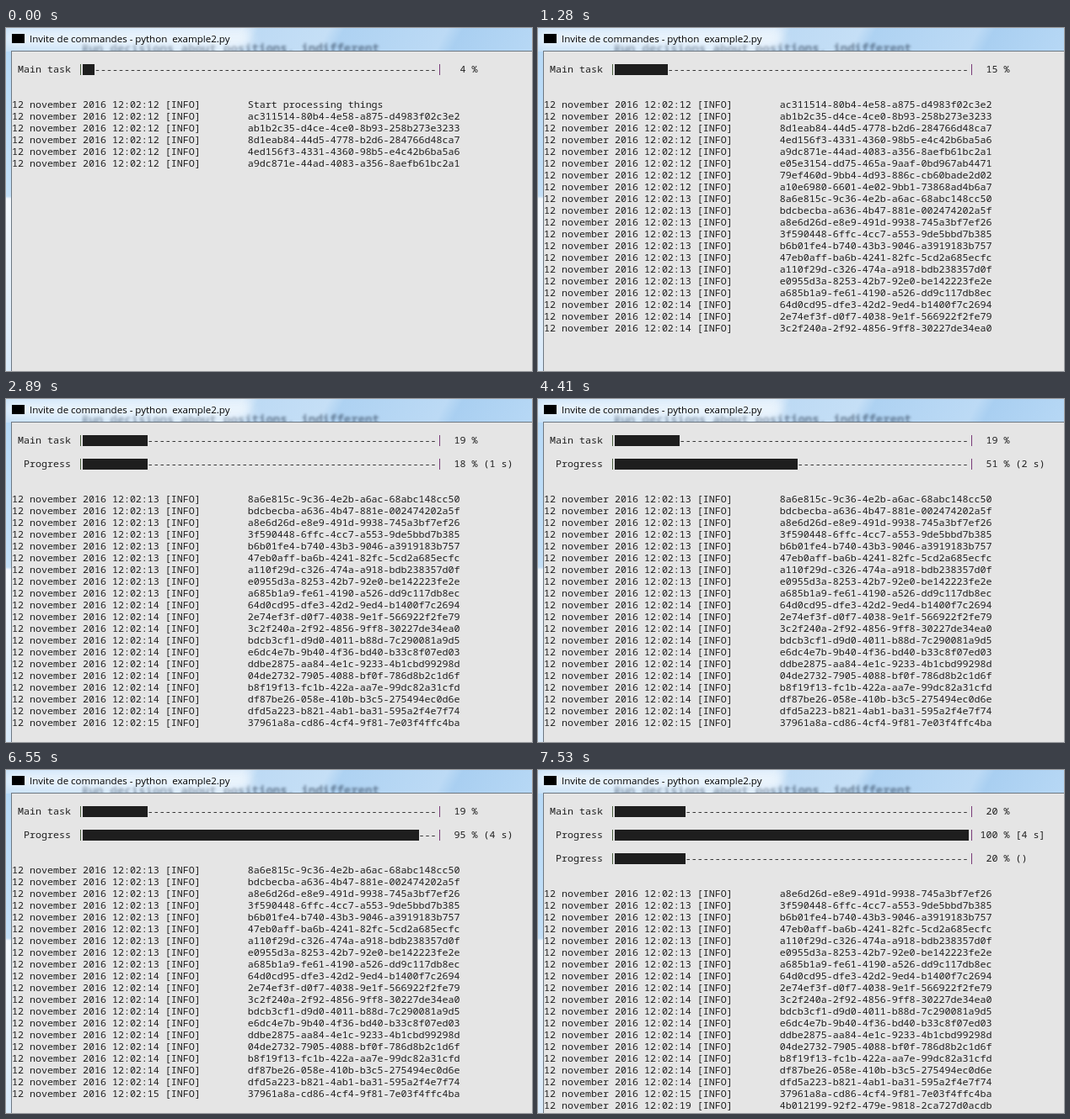
An HTML page for the animation above (8 s loop, 624 by 408 pixels).

```html
<!DOCTYPE html>
<html lang="fr">
<head>
<meta charset="utf-8">
<title>Invite de commandes</title>
<style>
html, body { margin: 0; width: 100%; height: 100%; overflow: hidden; }
body { position: relative; background: linear-gradient(#b6d9f7, #c4e0f8 200px, #f3f8fd 203px, #d9eafa); }
body > * { position: absolute; }
#glass { left: 0; top: 0; width: 624px; height: 28px; overflow: hidden;
  background: linear-gradient(118deg, #c3def6 0, #d3e7f9 25%, #d9eafa 44%, #bddaf4 47%, #c5dff6 60%, #aed2f2 63%, #bcdaf5 82%, #a9cff1 85%, #b7d8f5); }
#behind { position: absolute; left: 90px; top: 15px; white-space: pre; color: #2c3e55; opacity: .6;
  filter: blur(1.8px); font: bold 14px/18px "Noto Sans Mono", monospace; }
#glow { position: absolute; left: 0; top: 2px; width: 290px; height: 20px; background: #eef6fd;
  filter: blur(6px); opacity: .85; }
#icon { left: 7px; top: 7px; width: 15px; height: 11px; background: #000; }
svg { left: 0; top: 0; }
text { white-space: pre; fill: #1e1e1e; font: 11.6667px "Noto Sans Mono", "DejaVu Sans Mono", monospace; }
text.title { fill: #000; font: 11.55px "Open Sans", "Noto Sans", sans-serif; }
</style>
</head>
<body>
<div id="glass"><div id="behind">Run decisions about positions, indifferent</div><div id="glow"></div></div>
<div id="icon"></div>
<svg width="624" height="408">
  <text class="title" x="28" y="17">Invite de commandes - python  example2.py</text>
  <path d="M6 27H624V408H6Z" fill="#6d7882"/>
  <path d="M7 28H624V408H7Z" fill="#e5e5e5"/>
  <g id="screen"></g>
</svg>
<script>
const CELL = 7, ROW = 14, CELLS = 60, BAR_X = 91, LOOP = 8000;

const messages = `Start processing things
ac311514-80b4-4e58-a875-d4983f02c3e2
ab1b2c35-d4ce-4ce0-8b93-258b273e3233
8d1eab84-44d5-4778-b2d6-284766d48ca7
4ed156f3-4331-4360-98b5-e4c42b6ba5a6
a9dc871e-44ad-4083-a356-8aefb61bc2a1
e05e3154-dd75-465a-9aaf-0bd967ab4471
79ef460d-9bb4-4d93-886c-cb60bade2d02
a10e6980-6601-4e02-9bb1-73868ad4b6a7
8a6e815c-9c36-4e2b-a6ac-68abc148cc50
bdcbecba-a636-4b47-881e-002474202a5f
a8e6d26d-e8e9-491d-9938-745a3bf7ef26
3f590448-6ffc-4cc7-a553-9de5bbd7b385
b6b01fe4-b740-43b3-9046-a3919183b757
47eb0aff-ba6b-4241-82fc-5cd2a685ecfc
a110f29d-c326-474a-a918-bdb238357d0f
e0955d3a-8253-42b7-92e0-be142223fe2e
a685b1a9-fe61-4190-a526-dd9c117db8ec
64d0cd95-dfe3-42d2-9ed4-b1400f7c2694
2e74ef3f-d0f7-4038-9e1f-566922f2fe79
3c2f240a-2f92-4856-9ff8-30227de34ea0
bdcb3cf1-d9d0-4011-b88d-7c290081a9d5
e6dc4e7b-9b40-4f36-bd40-b33c8f07ed03
ddbe2875-aa84-4e1c-9233-4b1cbd99298d
04de2732-7905-4088-bf0f-786d8b2c1d6f
b8f19f13-fc1b-422a-aa7e-99dc82a31cfd
df87be26-058e-410b-b3c5-275494ec0d6e
dfd5a223-b821-4ab1-ba31-595a2f4e7f74
37961a8a-cd86-4cf4-9f81-7e03f4ffc4ba
4b012199-92f2-479e-9818-2ca727d0acdb`.split('\n');

// Index of the first message logged in each second
const seconds = [[29, 19], [28, 15], [18, 14], [9, 13], [0, 12]];

// Start time, main percent, messages logged, then [percent, elapsed] per sub-task
const steps = [
  [0, 4, 6],
  [280, 7, 11],
  [720, 11, 16],
  [1280, 15, 21],
  [1840, 18, 26],
  [2270, 19, 29, [8, '()']],
  [2890, 19, 29, [18, '(1 s)']],
  [3330, 19, 29, [30, '(1 s)']],
  [3850, 19, 29, [40, '(2 s)']],
  [4410, 19, 29, [51, '(2 s)']],
  [4960, 19, 29, [62, '(3 s)']],
  [5390, 19, 29, [73, '(3 s)']],
  [5980, 19, 29, [84, '(4 s)']],
  [6550, 19, 29, [95, '(4 s)']],
  [6970, 20, 30, [100, '[4 s]']],
  [7530, 20, 31, [100, '[4 s]'], [20, '()']]
];

const text = (y, s) => `<text x="7" y="${y}">${s}</text>`;
const rect = (x, y, w, fill) => `<rect x="${x}" y="${y}" width="${w}" height="13" fill="${fill}"/>`;

function bar(y, label, percent, elapsed = '') {
  const done = Math.round(percent * CELLS / 100);
  const track = ' '.repeat(done) + '-'.repeat(CELLS - done);
  return text(y, `${label.padStart(10)}  ${track}  ${String(percent).padStart(3)} % ${elapsed}`) +
    rect(88, y - 10, 1, '#4c6040') +
    rect(BAR_X, y - 10, done * CELL, '#1e1e1e') +
    rect(514, y - 10, 1, '#783a78');
}

function logLine(i) {
  const second = seconds.find(([first]) => i >= first)[1];
  return `12 november 2016 12:02:${second} [INFO]`.padEnd(40) + messages[i];
}

function render([, main, logged, ...tasks]) {
  let out = bar(53, 'Main task', main);
  tasks.forEach(([percent, elapsed], k) => out += bar(81 + 28 * k, 'Progress', percent, elapsed));
  const first = Math.max(0, logged - 20), top = 95 + 28 * tasks.length;
  for (let i = first; i < Math.min(logged, messages.length); i++)
    out += text(top + (i - first) * ROW, logLine(i));
  return out;
}

const screen = document.getElementById('screen');
const start = performance.now();
let shown;

function frame() {
  const t = (performance.now() - start) % LOOP;
  const step = steps.findLast(s => s[0] <= t);
  if (step !== shown) screen.innerHTML = render(shown = step);
  requestAnimationFrame(frame);
}
frame();
</script>
</body>
</html>
```
